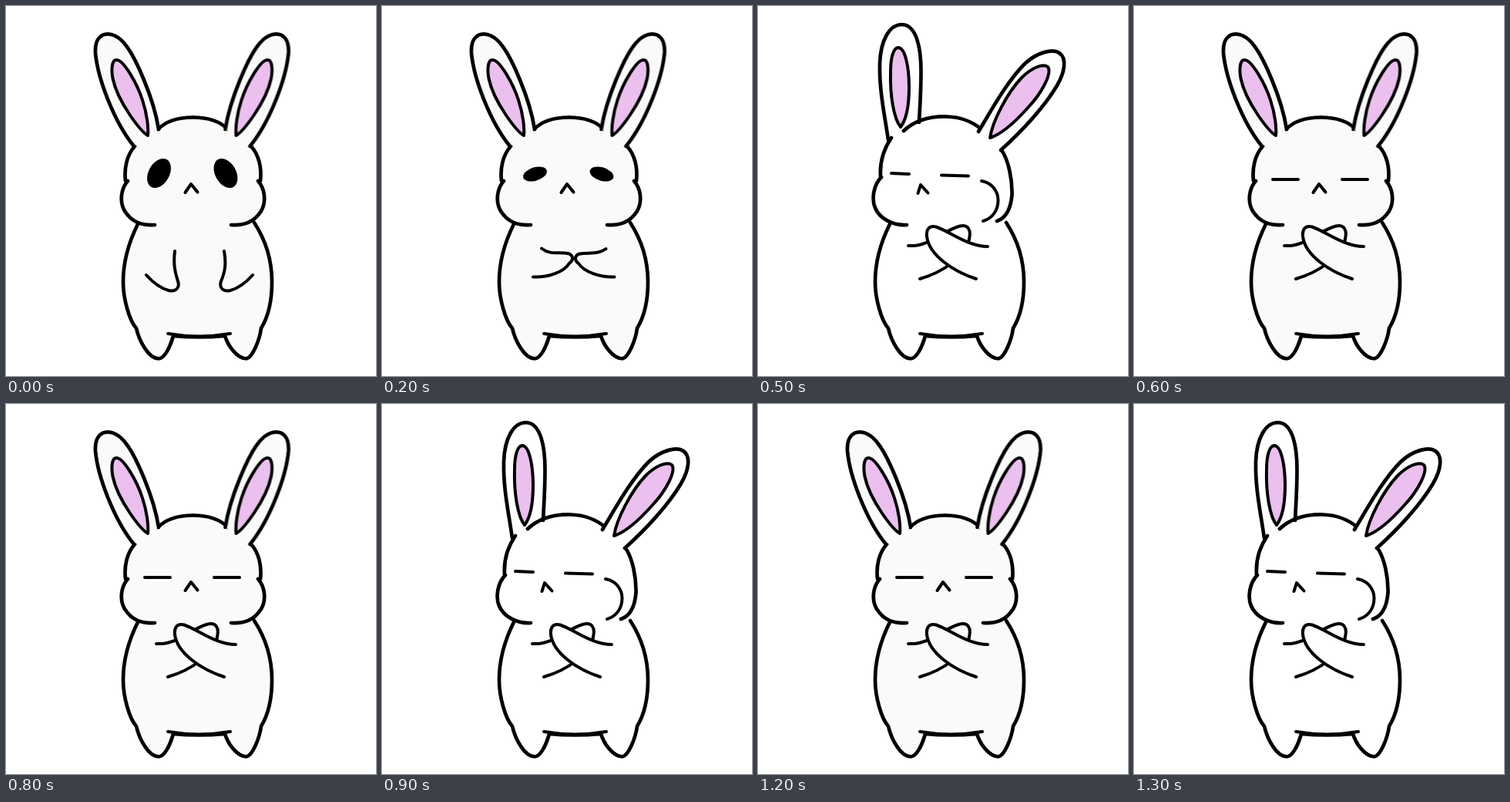
Recreate the animation shown at these times as an HTML page without scripts. Size 480 by 480 pixels, loop 1400 ms.

```html
<!DOCTYPE html>
<html lang="en">
<head>
<meta charset="utf-8">
<title>Bunny shaking its head</title>
<style>
  html, body { margin: 0; width: 100%; height: 100%; overflow: hidden; background: #fff; }
  svg { display: block; width: 100vw; height: 100vh; }

  .ink { stroke: #000; stroke-width: 4; stroke-linecap: round; stroke-linejoin: round; }
  .rim { stroke-width: 4.7; }
  .fill { stroke: none; }
  .line { fill: none; }
  .pink { fill: #ebbfee; }
  .eye { fill: #000; stroke: none; }

  .ink, .front, .right, .left, .open, .shut { animation: 1.4s step-end infinite; }
  .ink { animation-name: tint; }
  .front { animation-name: front; }
  .right { animation-name: right; }
  .left { animation-name: left; }
  .open { animation-name: open; transform-origin: 242px 219px; }
  .shut { animation-name: shut; }
  .arm { animation: 1.4s linear infinite; }
  .back { animation-name: back; }
  .fore { animation-name: fore; }

  @keyframes tint {
    0%, 42.85%, 57.14%, 71.42%, 85.71% { fill: #fafafa; }
    35.71%, 50%, 64.28%, 78.57%, 92.85%, 100% { fill: #fff; }
  }
  @keyframes front {
    0%, 42.85%, 57.14%, 71.42%, 85.71% { opacity: 1; }
    35.71%, 50%, 64.28%, 78.57%, 92.85%, 100% { opacity: 0; }
  }
  @keyframes right {
    0%, 42.85%, 71.42% { opacity: 0; }
    35.71%, 64.28%, 92.85%, 100% { opacity: 1; }
  }
  @keyframes left {
    0%, 57.14%, 85.71%, 100% { opacity: 0; }
    50%, 78.57% { opacity: 1; }
  }
  @keyframes open {
    0% { opacity: 1; transform: none; }
    14.28% { opacity: 1; transform: scaleY(.5); }
    21.42%, 100% { opacity: 0; transform: scaleY(.5); }
  }
  @keyframes shut {
    0% { opacity: 0; }
    21.42%, 100% { opacity: 1; }
  }
  @keyframes back {
    0% {
      d: path("M219 318C217 335 219 345 223 357C226 366 220 371 211 369C200 366 191 359 182 349");
      animation-timing-function: steps(4);
    }
    28.57%, 100% {
      d: path("M195 311C222 313 240 291 262 285.5C272 283 276 290 274.5 299C272 325 238 346 210 354");
    }
  }
  @keyframes fore {
    0% {
      d: path("M283 318C286 335 284 345 279 357C276 366 282 371 291 369C302 366 311 359 320 349");
      animation-timing-function: steps(4);
    }
    28.57%, 100% {
      d: path("M298 312C272 312 250 293 231 286.5C222 284 218 290 219 299C222 324 255 345 283 354");
    }
  }
</style>
</head>
<body>
<svg viewBox="0 0 480 480">
  <defs>
    <g id="face">
      <path class="fill" d="M243 144C222 144 207 150 197 160L167 182C157 193 153 210 155 227C147 237 147 254 154 266C163 280 175 285 193 284H243Z"/>
      <path class="rim line" d="M242.5 144.5C222 144.5 207 150 197 160M167 182C157 193 153 210 155 227M158 227C149 237 147 254 154 266C163 280 175 285 193 284"/>
    </g>
    <g id="lop">
      <path class="rim" d="M166 182C140 150 119 94 116 61C115 43 123 35.5 134 36.5C152 38 166 64 179 96C188 118 195 140 198 160"/>
      <path class="pink" d="M184 168C175 163 145 125 138.500 94C136 80 138 70 143 70C152 69 170 100 177 122C183 140 185 158 184 168Z"/>
    </g>

    <g id="skull">
      <path class="fill" d="M173 171L189 162C205 147 225 143 245 143.500C263 144 278 150 290 160L316 187C325 200 330 225 329.500 245C328 262 322 275 310 279L292 284H193C175 285 158 276 152 262C147 250 150 232 160 221C158 205 162 187 173 171Z"/>
      <path class="rim" d="M169 174C165 145 157 110 158 75C159 45 170 24 187 24C206 25 211.500 55 211.500 85C211.500 110 210 132 209 151"/>
      <path class="pink" d="M185 157C176 146 171 115 172 85C172 66 176 54 182 54C191 54 196 80 196 105C196 130 192 148 185 157Z"/>
      <path class="rim line" d="M189 162C205 147 225 143 245 143.500C263 144 278 150 290 160M316 187C325 200 330 225 329.500 245C328 262 322 275 310 279M173 171C162 187 158 205 159 221M160 222C150 232 147 250 152 262C158 276 175 285 193 284"/>
      <path class="line" d="M290 227C303 229 311.500 240 311.500 252C311.500 266 303 276 292 279M173 217L196 218M238 219.500L273 220.500M207.500 243L211 232L220.500 242.500"/>
    </g>
    <g id="ear">
      <path class="rim" d="M286 163C300 140 322 99 346 75C362 60 382 55 391 61C401 68 398 86 388 103C373 129 343 162 315 187"/>
      <path class="pink" d="M301 171C304 150 323 113 342 93C355 80 370 74 376 79C382 87 368 113 351 131C335 149 317 166 301 171Z"/>
    </g>
  </defs>

  <g class="ink" fill="#fafafa">
    <path class="rim" d="M171 283C160 305 152 330 152 358C152 380 160 408 169 418C173 435 185 457.500 198 457.500C206 457 213 442 217 428Q250 431 284 428C288 441 300 457.500 312 457.500C320 456 329 433 331 418C339 405 345 385 345 358C345 330 337 304 322 281"/>
    <path class="line" d="M210 425Q250 432 291 425"/>

    <g class="front">
      <use href="#face"/>
      <use href="#face" transform="matrix(-1 0 0 1 485 0)"/>
      <use href="#lop"/>
      <use href="#lop" transform="matrix(-1 0 0 1 482.5 0)"/>
      <path class="line" d="M232.500 242L240 231L248.500 241.500"/>
      <g class="open">
        <ellipse class="eye" cx="198.5" cy="217" rx="13.5" ry="20.5" transform="rotate(29 198.5 217)"/>
        <ellipse class="eye" cx="285" cy="217" rx="13.5" ry="20.5" transform="rotate(-29 285 217)"/>
      </g>
      <path class="line shut" opacity="0" d="M180 225H213M270 225H303"/>
    </g>

    <g class="right" opacity="0">
      <use href="#skull"/>
      <use href="#ear"/>
    </g>

    <g class="left" opacity="0">
      <g transform="matrix(-1 0 0 1 483 0)">
        <use href="#skull"/>
        <use href="#ear" transform="rotate(-3 302 175)"/>
      </g>
    </g>

    <path class="arm back" d="M195 311C222 313 240 291 262 285.5C272 283 276 290 274.5 299C272 325 238 346 210 354"/>
    <path class="arm fore" d="M298 312C272 312 250 293 231 286.5C222 284 218 290 219 299C222 324 255 345 283 354"/>
  </g>
</svg>
</body>
</html>
```
